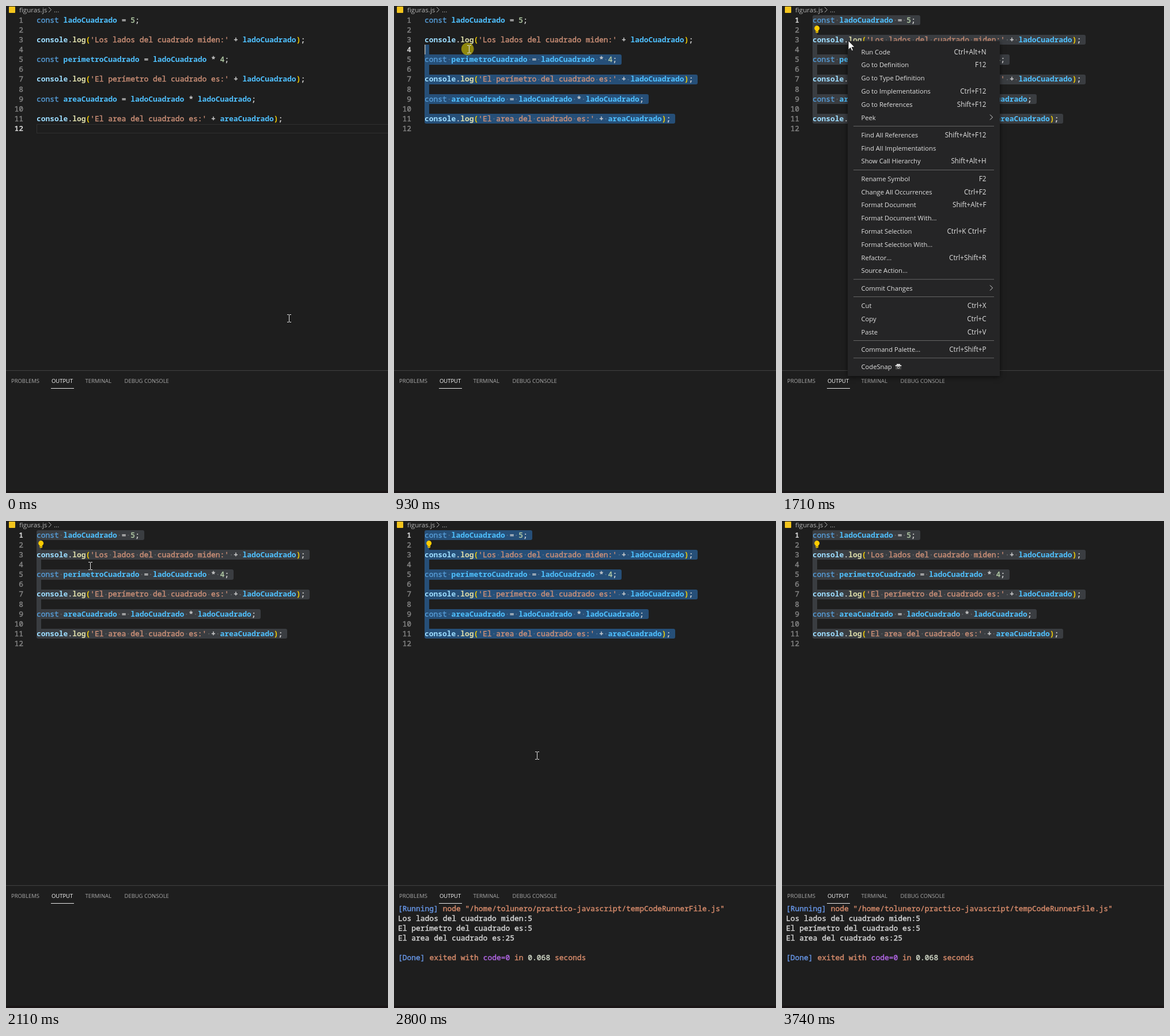
An HTML page with a canvas for the animation above (3820 ms loop, 663x845 px).

```html
<!DOCTYPE html>
<html lang="es">
<head>
<meta charset="utf-8">
<style>
  html, body { margin: 0; width: 100%; height: 100%; overflow: hidden; background: #1e1e1e; }
  canvas { display: block; }
</style>
</head>
<body>
<canvas id="stage" width="663" height="845"></canvas>
<script>
const ctx = document.getElementById('stage').getContext('2d');
const LOOP = 3820, LEFT = 53, TOP = 16, ROW = 17.1, CHAR = 7.77;
const MONO = '12.95px "Noto Sans Mono", monospace';
const UI = '"Open Sans", "Noto Sans", sans-serif';

const code = [
  "const ladoCuadrado = 5;", "",
  "console.log('Los lados del cuadrado miden:' + ladoCuadrado);", "",
  "const perimetroCuadrado = ladoCuadrado * 4;", "",
  "console.log('El perímetro del cuadrado es:' + ladoCuadrado);", "",
  "const areaCuadrado = ladoCuadrado * ladoCuadrado;", "",
  "console.log('El area del cuadrado es:' + areaCuadrado);", ""
];

const BLUE = '#6796e6', ORANGE = '#d88c6c', PLAIN = '#d8d8d8';
// Each output line is a list of [text, colour, weight].
const output = [
  [['[Running] ', BLUE], ['node "/home/tolunero/practico-javascript/tempCodeRunnerFile.js"', ORANGE]],
  [['Los lados del cuadrado miden:5', PLAIN]],
  [['El perímetro del cuadrado es:5', PLAIN]],
  [['El area del cuadrado es:25', PLAIN]],
  [],
  [['[Done] ', BLUE], ['exited with ', ORANGE], ['code=0 ', '#b267e6'], ['in ', ORANGE],
   ['0.068 ', '#d5dccb'], ['seconds', ORANGE]]
];

const menu = [
  ['Run Code|Ctrl+Alt+N', 'Go to Definition|F12', 'Go to Type Definition',
   'Go to Implementations|Ctrl+F12', 'Go to References|Shift+F12', 'Peek|>'],
  ['Find All References|Shift+Alt+F12', 'Find All Implementations', 'Show Call Hierarchy|Shift+Alt+H'],
  ['Rename Symbol|F2', 'Change All Occurrences|Ctrl+F2', 'Format Document|Shift+Alt+F',
   'Format Document With...', 'Format Selection|Ctrl+K Ctrl+F', 'Format Selection With...',
   'Refactor...|Ctrl+Shift+R', 'Source Action...'],
  ['Commit Changes|>'],
  ['Cut|Ctrl+X', 'Copy|Ctrl+C', 'Paste|Ctrl+V'],
  ['Command Palette...|Ctrl+Shift+P'],
  ['CodeSnap']
];

// Pointer path: [time, x, y].
const path = [
  [0, 491, 542], [70, 478, 520], [225, 345, 390], [375, 251, 230], [450, 262, 150], [525, 310, 165],
  [600, 400, 238], [675, 492, 202], [750, 499.5, 196], [825, 330, 150], [900, 130, 75], [975, 47, 25],
  [1200, 47, 25], [1275, 8, 36], [1350, 50, 55], [1425, 115.5, 61], [1725, 115, 60],
  [1875, 146, 78], [2325, 146, 78], [2475, 178, 190], [2700, 244, 390], [2775, 248.5, 407],
  [2925, 248.5, 407], [3075, 340, 500], [3225, 500, 700], [3375, 594, 819]
];

function pointerAt(t) {
  t = Math.floor(t / 75) * 75;
  const i = path.findIndex(p => p[0] > t);
  if (i < 0) return path.at(-1).slice(1);
  const [t0, x0, y0] = path[i - 1], [t1, x1, y1] = path[i], k = (t - t0) / (t1 - t0);
  return [x0 + (x1 - x0) * k, y0 + (y1 - y0) * k];
}

function rect(x, y, w, h, color, radius = 0) {
  ctx.fillStyle = color;
  ctx.beginPath();
  ctx.roundRect(x, y, w, h, radius);
  ctx.fill();
}

function disc(x, y, r, color) {
  ctx.fillStyle = color;
  ctx.beginPath();
  ctx.arc(x, y, r, 0, 7);
  ctx.fill();
}

function line(points, color, width = 1) {
  ctx.strokeStyle = color;
  ctx.lineWidth = width;
  ctx.beginPath();
  points.forEach(([x, y]) => ctx.lineTo(x, y));
  ctx.stroke();
}

const chevron = (x, y, color) => line([[x - 2, y - 4.5], [x + 2.5, y], [x - 2, y + 4.5]], color);

function label(text, x, y, size, color, align = 'left') {
  ctx.font = `${size}px ${UI}`;
  ctx.fillStyle = color;
  ctx.textAlign = align;
  ctx.fillText(text, x, y);
}

// Words sit on the character grid; a hairline outline gives the medium weight.
function mono(text, x, y, color, weight = 500) {
  ctx.font = `${weight} ${MONO}`;
  ctx.fillStyle = ctx.strokeStyle = color;
  ctx.lineWidth = .4;
  ctx.textAlign = 'left';
  for (const m of text.matchAll(/\S+/g)) {
    const wordX = x + m.index * CHAR;
    ctx.fillText(m[0], wordX, y);
    if (weight < 600) ctx.strokeText(m[0], wordX, y);
  }
}

const baseline = (top, row) => Math.round(top + ROW * row + 12.8);

function tokenStyle(token) {
  if (token[0] === "'") return ['#ce9178'];
  if (token === 'const') return ['#569cd6'];
  if (token === 'console') return ['#9cdcfe', 700];
  if (token === 'log') return ['#dcdcaa', 700];
  if (/[a-z]/i.test(token)) return ['#4fc1ff', 700];
  if (/\d/.test(token)) return ['#b5cea8'];
  if (/[()]/.test(token)) return ['#ffd700'];
  return ['#d4d4d4'];
}

function drawSelection(sel, color) {
  for (let row = sel.row; row < 11; row++) {
    const x = LEFT + (row === sel.row ? sel.col * CHAR : 0);
    const end = Math.round(LEFT + code[row].length * CHAR + 8);
    const y = Math.round(TOP + ROW * row), h = Math.round(TOP + ROW * (row + 1)) - y;
    if (end > x) rect(x, y, end - x, h, color, code[row] ? [row === sel.row ? 3 : 0, 3, 3, row === 10 ? 3 : 0] : 0);
    for (let col = row === sel.row ? sel.col : 0; col < code[row].length; col++)
      if (code[row][col] === ' ')
        disc(LEFT + (col + .5) * CHAR, y + 8.8, 1, 'rgba(227,228,226,.25)');
  }
}

function drawEditor(activeRow) {
  code.forEach((text, row) => {
    const y = baseline(TOP, row), number = String(row + 1), active = row === activeRow;
    mono(number, 30 - number.length * CHAR, y, active ? '#d0d0d0' : '#858585', active ? 700 : 500);
    for (const m of text.matchAll(/'[^']*'|[a-z]+|\d+|\S/gi))
      mono(m[0], LEFT + m.index * CHAR, y, ...tokenStyle(m[0]));
  });
}

function drawFrame() {
  rect(0, 0, 663, 845, '#1e1e1e');
  rect(5, 1, 11, 11, '#f4c51c', 1);
  label('figuras.js', 23, 10.5, 11.6, '#b4b4b4');
  chevron(76, 6.5, '#b4b4b4');
  label('...', 83, 10.5, 11.6, '#b4b4b4');
  rect(0, 632, 663, 1, '#414141');
  rect(0, 841, 663, 4, '#1a1617');
  [['PROBLEMS', 9], ['OUTPUT', 79], ['TERMINAL', 137.5], ['DEBUG CONSOLE', 205.5]].forEach(([name, x]) =>
    label(name, x, 653.5, 9.45, name === 'OUTPUT' ? '#ffffff' : '#aaaaaa'));
  rect(78, 663, 40, 1, '#e7e7e7');
}

function drawOutput(rows) {
  output.slice(0, rows).forEach((parts, row) => {
    let x = 7;
    for (const [text, color, weight] of parts) {
      mono(text, x, baseline(664, row), color, weight);
      x += text.length * CHAR;
    }
  });
}

function drawBulb() {
  disc(60.7, 38.6, 4.5, '#ffcc00');
  rect(58.5, 41, 4.5, 5.5, '#ffcc00', 1);
  rect(59.5, 44, 2.5, 1, '#6b5a10');
}

function drawCamera(x, y) {
  rect(x - 3, y - 5, 6, 2, '#d8d8d8');
  rect(x - 5.5, y - 3, 11, 2, '#d8d8d8', 1);
  rect(x - 5, y - 1, 10, 5.5, '#484848');
  disc(x, y + 1, 2.2, '#d0d0d0');
  disc(x, y + 1, 1.3, '#222');
}

function drawMenu(hovered) {
  ctx.shadowColor = 'rgba(0,0,0,.6)';
  ctx.shadowBlur = 8;
  ctx.shadowOffsetY = 2;
  rect(114, 61, 264, 581, '#252526');
  ctx.shadowColor = 'transparent';
  if (hovered) rect(114, 68, 264, 23, '#094771');
  let y = 79.5;
  menu.forEach((group, i) => {
    if (i) {
      rect(124, y - 8.3, 244, 1, '#656565');
      y += 7.5;
    }
    group.forEach(item => {
      const [name, keys] = item.split('|'), base = Math.round(y + 4);
      label(name, 137.5, base, 11.2, '#e2e2e2');
      if (keys === '>') chevron(363, y - .5, '#d8d8d8');
      else if (keys) label(keys, 354.5, base, 11.7, '#e2e2e2', 'right');
      y += 22.8;
    });
  });
  drawCamera(202, 626);
}

function drawArrow(x, y) {
  ctx.beginPath();
  [[0, 0], [0, 15.5], [3.6, 12.2], [6, 17.5], [8.4, 16.4], [6, 11.2], [11, 11.2]]
    .forEach(([dx, dy]) => ctx.lineTo(x + dx, y + dy));
  ctx.closePath();
  ctx.fillStyle = '#fff';
  ctx.fill();
  ctx.strokeStyle = '#111';
  ctx.lineWidth = .8;
  ctx.stroke();
}

function drawBeam(x, y) {
  x = Math.floor(x);
  y = Math.round(y);
  rect(x, y - 6, 1, 12, '#e4e4e4');
  for (const end of [y - 7, y + 6]) {
    rect(x - 3, end, 3, 1, '#e4e4e4');
    rect(x + 1, end, 3, 1, '#e4e4e4');
  }
}

function selectionAt(t, x, y) {
  if (t < 860) return null;
  if (t >= 1010) return { row: 0, col: 0 };
  const row = Math.max(0, Math.min(10, Math.floor((y - TOP) / ROW)));
  const col = Math.max(0, Math.min(code[row].length, Math.round((x - LEFT) / CHAR)));
  return { row, col };
}

function render(t) {
  const [x, y] = pointerAt(t);
  const sel = selectionAt(t, x, y);
  const menuOpen = t >= 1640 && t < 2110;
  const unfocused = t >= 1640 && t < 2190 || t >= 3740;

  drawFrame();
  if (sel) drawSelection(sel, unfocused ? '#3a3d41' : '#264f78');
  else {
    ctx.strokeStyle = '#303030';
    ctx.lineWidth = 1;
    ctx.strokeRect(53.5, 205.5, 620, 15);
  }
  drawEditor(sel ? sel.row : 11);

  const caretOn = t >= 860 && t < 1400 || t >= 2190 && t < 2690 || t >= 3200 && t < 3700;
  if (caretOn) rect(LEFT + sel.col * CHAR, Math.round(TOP + sel.row * ROW), 1.5, 17, '#aeafad');
  if (t >= 1330) drawBulb();

  if (t >= 2340) drawOutput(t < 2490 ? 1 : 6);
  if (menuOpen) drawMenu(t >= 1780);

  if (t >= 770 && t < 1250) disc(x - 2.3, y - .5, 10.8, 'rgba(255,240,0,.5)');
  if (menuOpen) drawArrow(x, y);
  else if (t < 3420) drawBeam(x, y);
}

function tick() {
  render(performance.now() % LOOP);
  requestAnimationFrame(tick);
}
tick();
</script>
</body>
</html>
```
